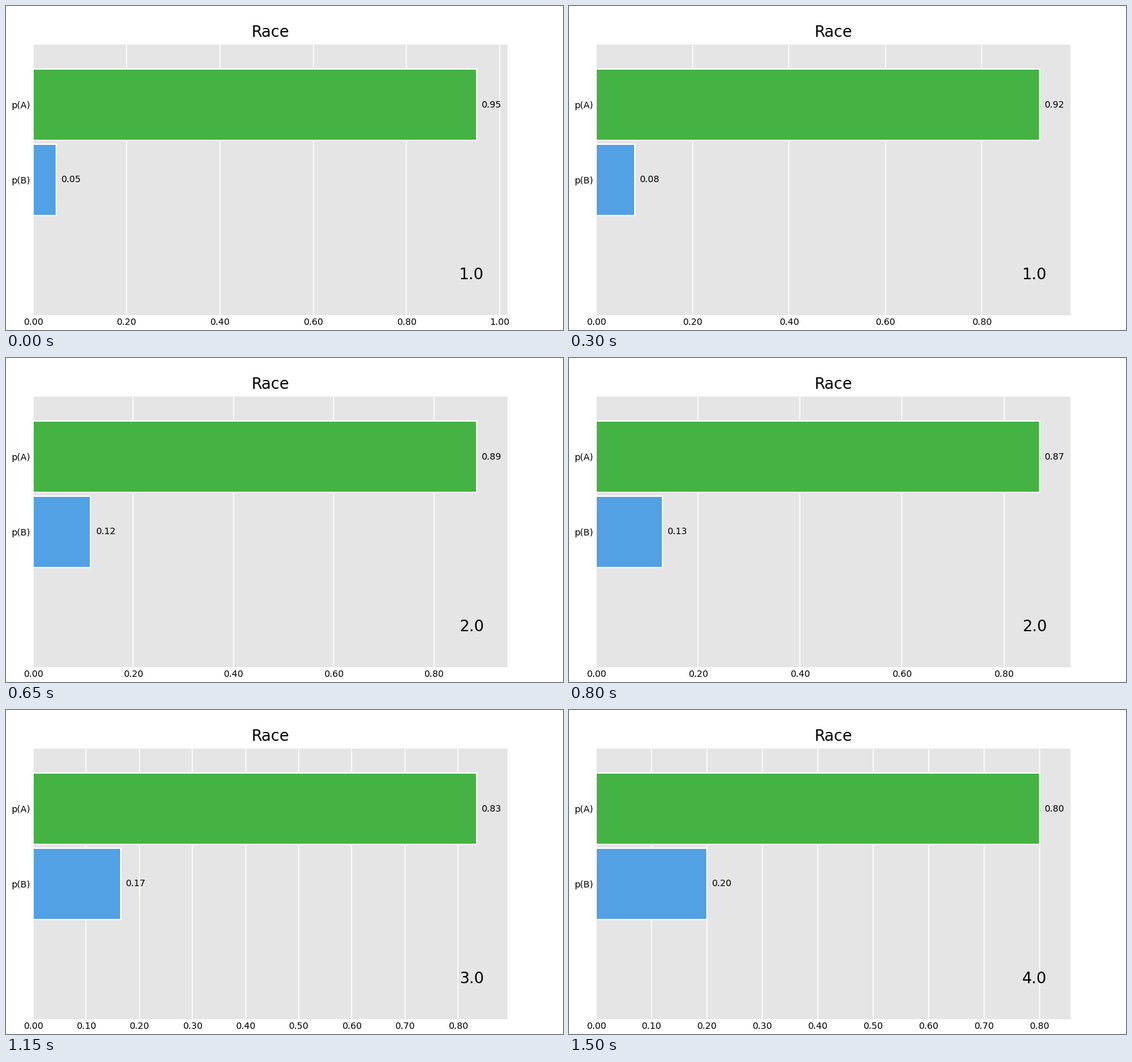
Animation of 864x504 px, one loop 1.55 s. Source, as a matplotlib script:

```python
import matplotlib.pyplot as plt
from matplotlib.animation import FuncAnimation

W, H, DPI = 864, 504, 144
LEFT, RIGHT, TOP, BOTTOM = 42, 778, 60, 481
FRAMES, STEPS_PER_PERIOD = 31, 10
HEADROOM = (RIGHT - LEFT) / 688  # axis length over the longest bar

plt.rcParams["font.family"] = "DejaVu Sans"

fig = plt.figure(figsize=(W / DPI, H / DPI), dpi=DPI, facecolor="white")
ax = fig.add_axes([LEFT / W, 1 - BOTTOM / H, (RIGHT - LEFT) / W, (BOTTOM - TOP) / H],
                  facecolor="#e5e5e5")
ax.set_axisbelow(True)
ax.grid(axis="x", color="white", linewidth=0.8)
ax.spines[:].set_visible(False)
ax.tick_params(length=0, pad=2, labelsize=7)
ax.xaxis.set_major_formatter("{x:,.2f}")
ax.set_title("Race", fontsize=12, pad=6)

rows = [2, 1]
bars = ax.barh(rows, [0.95, 0.05], height=0.95, color=["#45b343", "#52a1e5"],
               edgecolor="white", linewidth=1)
ax.set_yticks(rows, ["p(A)", "p(B)"])
ax.set_ylim(-0.8, 2.8)

labels = [ax.text(0, y, "", fontsize=7, va="center") for y in rows]
period = ax.text(0.95, 0.15, "", fontsize=12, ha="right", va="center",
                 transform=ax.transAxes)


def update(i):
    # Rounding keeps the half-way values exact before they are formatted.
    values = [round(0.95 - 0.005 * i, 3), round(0.05 + 0.005 * i, 3)]
    x_max = max(values) * HEADROOM
    ax.set_xlim(0, x_max)
    for bar, label, value in zip(bars, labels, values):
        bar.set_width(value)
        label.set_x(value + 0.01 * x_max)
        label.set_text(f"{value:.2f}")
    period.set_text(f"{1 + i // STEPS_PER_PERIOD:.1f}")
    return [*bars, *labels, period]


anim = FuncAnimation(fig, update, frames=FRAMES, interval=50, repeat=True,
                     repeat_delay=0, blit=False)
plt.show()
```
